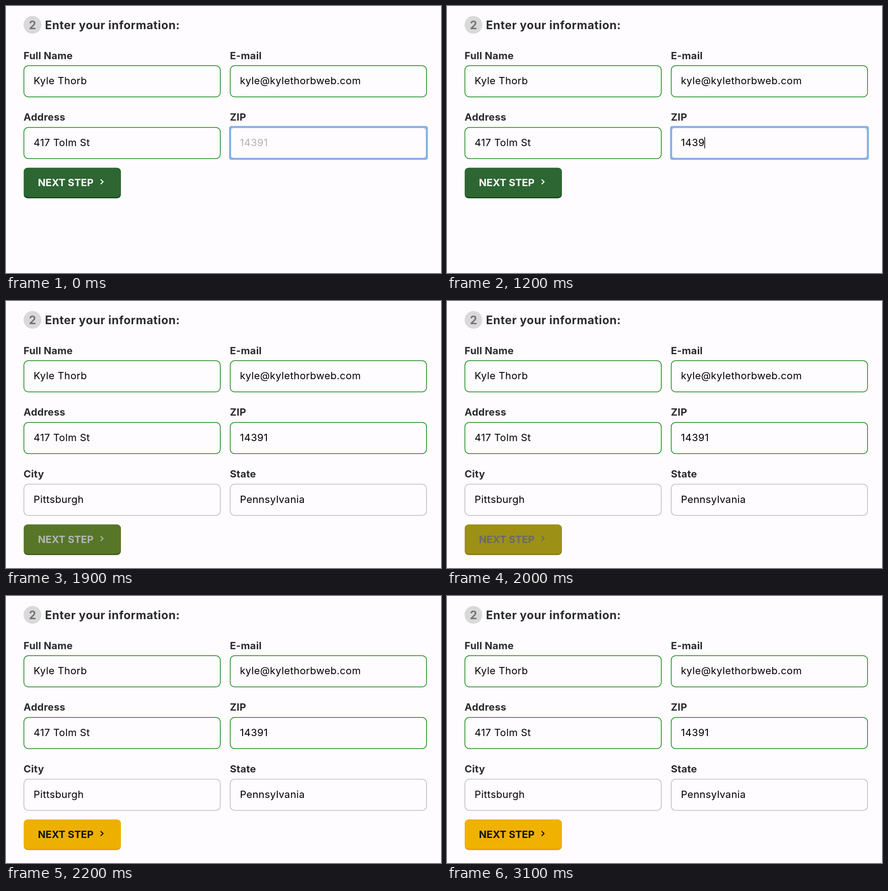
An HTML page that plays this animation: 954 px wide and 587 px high, repeating every 3700 ms.

```html
<!DOCTYPE html>
<html lang="en">
<head>
<meta charset="utf-8">
<title>Address form</title>
<style>
html, body { margin: 0; width: 100%; height: 100%; overflow: hidden; background: #fffcff; }
svg { display: block; width: 954px; height: 587px; font: 22px Inter, "Open Sans", sans-serif; }
.label, .head, .next { font-weight: 700; fill: #2b2b2d; }
.label { letter-spacing: .25px; }
.value { letter-spacing: .4px; }
.head { font-size: 25px; letter-spacing: .6px; }
.num { font-size: 25px; font-weight: 700; fill: #737374; text-anchor: middle; }
.box { fill: none; stroke: #b2b0b3; stroke-width: 1.3; }
.valid { stroke: #0b820f; stroke-width: 1.5; }
</style>
</head>
<body>
<svg viewBox="0 0 954 587">
  <circle cx="58" cy="41.5" r="19.5" fill="#dad9da"/>
  <text class="num" x="58" y="50.5">2</text>
  <text class="head" x="85.5" y="50.5">Enter your information:</text>
  <g id="fields"></g>
  <g id="ring" fill="none">
    <rect x="491.7" y="266.7" width="430.6" height="68.6" rx="9.5" fill="#fffcff" stroke="#a9bcd4" stroke-width="2"/>
    <rect x="491.5" y="266" width="431.5" height="70" rx="2.5" stroke="#a9cbf2" stroke-width="5"/>
    <rect x="491.5" y="266" width="431.5" height="70" rx="2.5" stroke="#78a6df" stroke-width="2.4"/>
  </g>
  <text id="zip" class="value" x="513" y="308"></text>
  <rect id="caret" y="288" width="1.5" height="25"/>
  <g id="button">
    <rect id="edge" x="38.9" y="355.7" width="213" height="67" rx="8.5"/>
    <rect id="face" x="38.9" y="355.7" width="213" height="64.6" rx="8.5"/>
    <text id="next" class="next" x="70" y="396">NEXT STEP</text>
    <path id="arrow" d="M207.5 381.2l5.3 5.3-5.3 5.3" fill="none" stroke-width="2.3"/>
  </g>
</svg>
<script>
const LOOP = 3700, REVEAL = 1900, ROW = 135.75, ZIP = "14391";
const KEY_TIMES = [200, 600, 1000, 1200, 1600];
const FACE_MIX = [.215, .57, .86, .985, 1];
const TEXT_MIX = [.31, .63, .88, .99, 1];
const el = id => document.getElementById(id);

function field(col, row, label, value, cls = "") {
  const x = col * 452.4, y = row * ROW;
  return `<g class="row${row}">
    <text class="label" x="${38.5 + x}" y="${116.5 + y}">${label}</text>
    <rect class="box ${cls}" x="${39.3 + x}" y="${131.2 + y}" width="430.6" height="68.6" rx="9.5"/>
    <text class="value" x="${60.5 + x}" y="${172 + y}">${value}</text></g>`;
}

el("fields").innerHTML =
  field(0, 0, "Full Name", "Kyle Thorb", "valid") +
  field(1, 0, "E-mail", "kyle@kylethorbweb.com", "valid") +
  field(0, 1, "Address", "417 Tolm St", "valid") +
  field(1, 1, "ZIP", "", "valid") +
  field(0, 2, "City", "Pittsburgh") +
  field(1, 2, "State", "Pennsylvania");

const mix = (a, b, p) => `rgb(${a.map((v, i) => Math.round(v + (b[i] - v) * p))})`;
const show = (node, on) => node.setAttribute("visibility", on ? "visible" : "hidden");

function draw(t) {
  const done = t >= REVEAL;
  const typed = KEY_TIMES.filter(k => t >= k).length;
  const zip = el("zip");
  zip.textContent = typed ? ZIP.slice(0, typed) : ZIP;
  zip.setAttribute("fill", typed ? "#000" : "#b3b1b3");
  el("caret").setAttribute("x", 512.5 + zip.getComputedTextLength());
  show(el("caret"), typed && !done);
  show(el("ring"), !done);
  document.querySelectorAll(".row1 .box")[1].setAttribute("visibility", done ? "visible" : "hidden");
  document.querySelectorAll(".row2").forEach(g => show(g, done));

  const step = Math.min(4, Math.floor((t - REVEAL) / 100));
  const p = done ? FACE_MIX[step] : 0;
  const ink = mix([255, 255, 255], [17, 17, 17], done ? TEXT_MIX[step] : 0);
  el("button").setAttribute("transform", `translate(0 ${done ? ROW : 0})`);
  el("face").setAttribute("fill", mix([45, 102, 51], [240, 177, 0], p));
  el("edge").setAttribute("fill", mix([15, 65, 22], [220, 156, 0], p));
  el("next").style.fill = ink;
  el("arrow").setAttribute("stroke", ink);
}

const start = performance.now();
function tick() {
  draw((performance.now() - start) % LOOP);
  requestAnimationFrame(tick);
}
tick();
</script>
</body>
</html>
```
